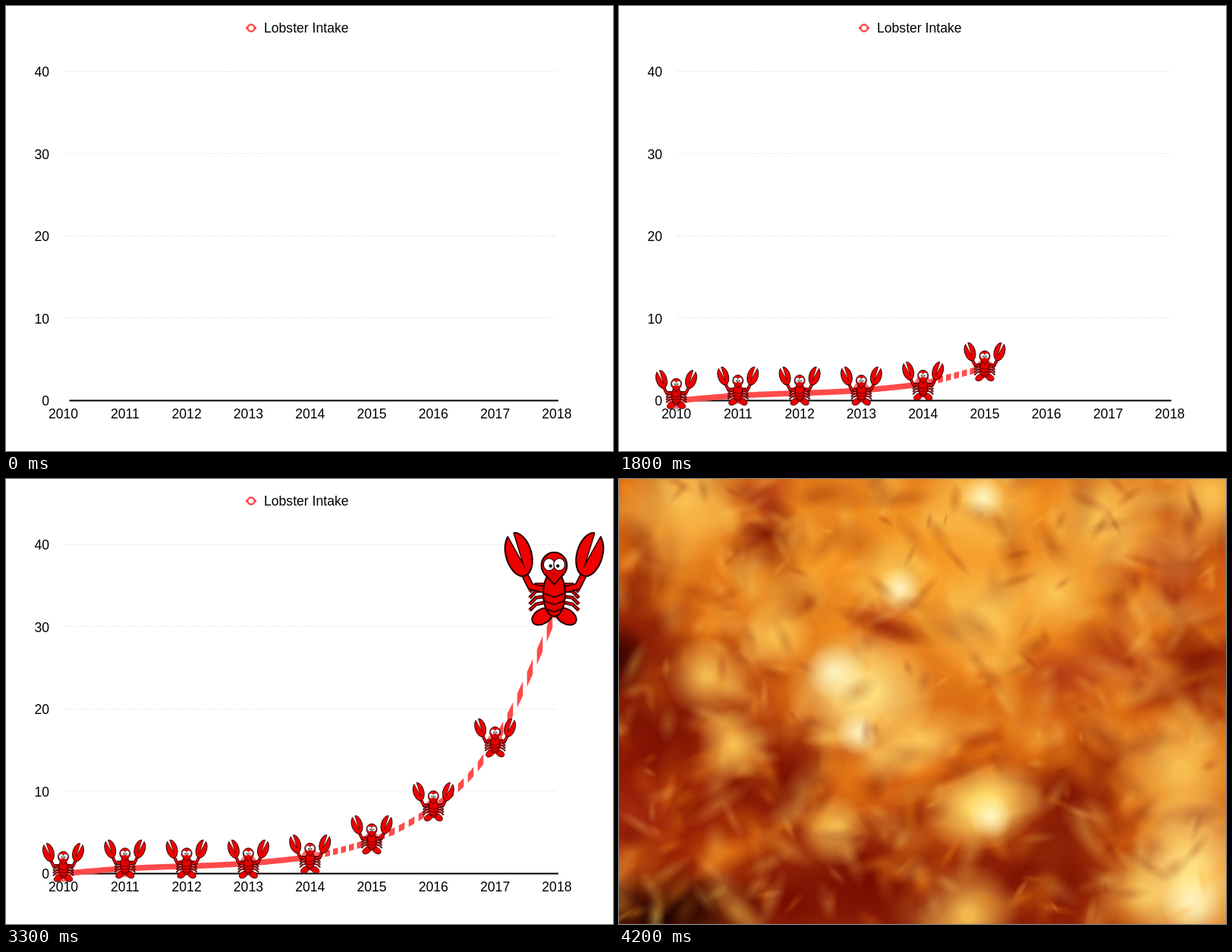
Write an HTML page with a canvas that moves like this. It is 800 px wide and 587 px high and loops after 5700 ms.

```html
<!DOCTYPE html>
<html lang="en">
<head>
<meta charset="utf-8">
<title>Lobster Intake</title>
<style>
  html, body { margin: 0; width: 100%; height: 100%; overflow: hidden; background: #fff; }
  canvas { display: block; }
</style>
</head>
<body>
<canvas id="stage" width="800" height="587"></canvas>
<script>
const W = 800, H = 587, STEP = 300, LOOP = 5700;
const c = document.getElementById('stage').getContext('2d');
const RED = '#ff4a4a';
const values = [0, .6, .9, 1.25, 2, 4, 8, 16, 32];
const lobsterY = [506, 501.5, 501.5, 501.5, 495, 469.5, 426, 341.5, 167];
const px = year => 75.5 + year * 81.3;
const py = value => 520.5 - value * 10.86;

function seeded(seed) {
  return () => (seed = (seed * 16807) % 2147483647) / 2147483647;
}

function line(points, color, width) {
  c.beginPath();
  points.forEach(([x, y]) => c.lineTo(x, y));
  c.strokeStyle = color;
  c.lineWidth = width;
  c.stroke();
}

function ellipse(x, y, rx, ry, fill, rot = 0, stroke) {
  c.beginPath();
  c.ellipse(x, y, rx, ry, rot, 0, 7);
  c.fillStyle = fill;
  c.fill();
  if (stroke) {
    c.strokeStyle = '#200';
    c.lineWidth = stroke;
    c.stroke();
  }
}

function polygon(points, fill) {
  c.beginPath();
  points.forEach(([x, y]) => c.lineTo(x, y));
  c.closePath();
  c.fillStyle = fill;
  c.fill();
}

// Soft-edged ellipse; core is the share of the radius with full colour
function glow(x, y, rx, ry, rgb, alpha = 1, core = 0, rot = 0) {
  c.save();
  c.translate(x, y);
  c.rotate(rot);
  c.scale(rx, ry);
  const g = c.createRadialGradient(0, 0, core, 0, 0, 1);
  g.addColorStop(0, `rgba(${rgb},${alpha})`);
  g.addColorStop(1, `rgba(${rgb},0)`);
  c.fillStyle = g;
  c.fillRect(-1, -1, 2, 2);
  c.restore();
}

function glows(rgb, alpha, core, list) {
  list.forEach(([x, y, r]) => glow(x, y, r, r, rgb, alpha, core));
}

// Random light and dark wisps inside a box
function wisps(seed, count, x, y, w, h, size, alpha) {
  const rnd = seeded(seed);
  const tones = ['255,215,100', '120,15,0', '255,150,25'];
  for (let i = 0; i < count; i++) {
    const r = size * (.4 + rnd());
    glow(x + w * rnd(), y + h * rnd(), r, r * (.25 + rnd() * .35),
      tones[i % 3], alpha, 0, rnd() * 3.14);
  }
}

// Natural cubic spline through evenly spaced values
function spline(from, to) {
  const y = values.slice(from, to + 1), n = y.length - 1, m = y.map(() => 0);
  for (let k = 0; k < 40; k++)
    for (let i = 1; i < n; i++)
      m[i] = (6 * (y[i - 1] - 2 * y[i] + y[i + 1]) - m[i - 1] - m[i + 1]) / 4;
  const points = [];
  for (let s = 0; s <= n * 24; s++) {
    const i = Math.min(n - 1, Math.floor(s / 24)), b = s / 24 - i, a = 1 - b;
    const v = a * y[i] + b * y[i + 1] + ((a ** 3 - a) * m[i] + (b ** 3 - b) * m[i + 1]) / 6;
    points.push([px(from + i + b), py(v)]);
  }
  return points;
}

function lobster(x, y, scale) {
  c.save();
  c.translate(x, y);
  c.scale(scale, scale);
  for (const side of [-1, 1]) {
    c.save();
    c.scale(side, 1);
    for (let i = 0; i < 4; i++) {
      const leg = [[4, 3 + i * 3.2], [10, 3 + i * 3.6], [13.5, 7 + i * 3.4]];
      line(leg, '#200', 2);
      line(leg, '#d00', .9);
    }
    const arm = [[17, -4], [13, 4], [5, 6]];
    line(arm, '#200', 4);
    line(arm, '#e00', 2.6);
    ellipse(6.5, 20.5, 6.2, 4, '#f00000', .55, .8);
    c.translate(19.5, -13.5);
    c.rotate(.27);
    ellipse(0, 0, 7, 12.2, '#f00000', 0, .9);
    polygon([[-.5, -13.2], [3.4, -12.5], [-1, 6]], '#fff');
    line([[-.5, -12.2], [-1, 6], [3.2, -11.4]], '#200', .6);
    c.restore();
  }
  ellipse(0, 8, 6, 12.5, '#e80000', 0, .9);
  for (let i = 0; i < 3; i++)
    line([[-5.4, 8 + i * 4], [0, 10 + i * 4], [5.4, 8 + i * 4]], '#300', .8);
  ellipse(0, -7.5, 7, 7.2, '#f00000', 0, .9);
  for (const side of [-1, 1]) {
    ellipse(side * 2.8, -8, 3.1, 3.4, '#fff', 0, .5);
    ellipse(side * 2, -7.2, .9, .9, '#000');
  }
  polygon([[-6, -3.5], [0, -5], [6, -3.5], [0, 4]], '#e00000');
  line([[-5.5, -3], [0, 3], [5.5, -3]], '#300', .9);
  c.restore();
}

function axes() {
  c.fillStyle = '#fff';
  c.fillRect(0, 0, W, H);
  c.fillStyle = '#000';
  c.font = '17.6px "Liberation Sans", Arial, sans-serif';
  c.textAlign = 'right';
  for (let v = 0; v <= 40; v += 10) c.fillText(v, 57, py(v) + 6.8);
  c.textAlign = 'center';
  for (let i = 0; i < 9; i++) c.fillText(2010 + i, px(i), 544.3);
  c.textAlign = 'left';
  c.fillText('Lobster Intake', 340, 35.3);

  c.setLineDash([5, 2]);
  for (let v = 10; v <= 40; v += 10) {
    const y = Math.floor(py(v)) + .5;
    line([[76, y], [726, y]], '#eee', 1);
  }
  c.setLineDash([]);
  line([[83.5, 520.5], [728, 520.5]], '#000', 2);
  line([[316, 29], [330, 29]], RED, 3);
  ellipse(323, 29, 5.8, 5.8, RED);
  ellipse(323, 29, 3.3, 3.3, '#fff');
}

// Vertical slices cut the forecast part into dashes
function forecast(last) {
  c.save();
  c.beginPath();
  for (let x = 410; x < 480; x += 10.5) c.rect(x, 0, 6.5, H);
  for (let x = 478.7; x < 735; x += 13) c.rect(x, 0, 7.6, H);
  c.clip();
  line(spline(4, last), RED, 8);
  c.restore();
}

function chart(count, big) {
  axes();
  const last = count - 1;
  if (last > 0) line(spline(0, Math.min(last, 4)), RED, 7.5);
  if (last > 4) forecast(last);
  for (let i = 0; i < count; i++) {
    const grown = big && i === 8;
    ellipse(px(i), py(values[i]), 11, 11, '#ff6b69');
    if (grown) lobster(722.5, 132, 2.4);
    else lobster(px(i), lobsterY[i], 1);
  }
}

function ragged(seed, x, y, rx, ry, jitter, fill) {
  const rnd = seeded(seed), points = [];
  for (let i = 0; i < 90; i++) {
    const a = i / 90 * 2 * Math.PI;
    const k = 1 + .05 * Math.sin(a * 4 - 1.5) + jitter * (rnd() - .5);
    points.push([x + rx * k * Math.cos(a), y + ry * k * Math.sin(a)]);
  }
  polygon(points, fill);
}

function fireball() {
  ragged(41, 716, 126, 66, 68, .14, '#1d2a31');
  polygon([[645, 70], [662, 72], [676, 58], [690, 61], [684, 75], [662, 92], [647, 84]], '#1d2a31');
  polygon([[704, 55], [718, 52], [724, 64], [702, 66]], '#1d2a31');
  c.save();
  ragged(97, 713, 126, 65, 65, .08, '#d97712');
  c.clip();
  glows('105,35,8', .75, .1, [[668, 135, 32], [688, 165, 28], [764, 150, 28], [662, 102, 20], [745, 180, 26]]);
  glows('255,185,45', .85, .1, [[740, 95, 34], [705, 112, 28], [718, 145, 28], [690, 80, 22], [758, 125, 22]]);
  wisps(7, 150, 646, 58, 136, 136, 11, .5);
  c.restore();
}

function cloud() {
  const sky = c.createRadialGradient(405, 250, 60, 405, 225, 500);
  [[0, '#ffd070'], [.16, '#e88a24'], [.31, '#bd3a08'], [.46, '#990d02'], [.66, '#590604'], [.85, '#280404'], [1, '#170303']]
    .forEach(([at, color]) => sky.addColorStop(at, color));
  c.fillStyle = sky;
  c.fillRect(0, 0, W, H);
  glow(60, 400, 290, 190, '22,3,3', .95, .3);
  glow(730, 400, 250, 170, '22,2,2', .95, .3);

  // Stem
  polygon([[320, 320], [510, 320], [545, 400], [590, 500], [180, 500], [225, 440], [280, 390]], '#b93c0a');
  glows('150,22,4', .85, .3, [[265, 415, 45], [555, 420, 45], [260, 350, 38], [300, 340, 42], [545, 355, 42], [230, 450, 42]]);
  glows('240,120,20', .8, .2, [[350, 390, 65], [460, 385, 60], [350, 460, 70], [500, 450, 60]]);
  wisps(23, 110, 240, 335, 300, 160, 20, .45);
  glows('255,232,130', .95, .3, [[430, 360, 42], [405, 395, 20], [415, 460, 28], [515, 470, 34], [200, 470, 18], [315, 480, 24], [540, 405, 18], [455, 385, 26]]);

  // Cap
  glows('255,190,80', 1, .75, [[245, 290, 36], [565, 305, 33], [320, 310, 40], [470, 310, 38], [535, 320, 30]]);
  glows('240,255,244', 1, .85, [[405, 200, 53], [320, 216, 46], [462, 202, 42], [260, 255, 46], [345, 245, 62], [510, 243, 50],
    [545, 262, 37], [430, 230, 60], [565, 290, 30], [245, 275, 32], [490, 280, 42]]);
  glows('218,150,62', .9, .55, [[425, 262, 46], [400, 300, 42], [355, 305, 38], [440, 305, 32]]);
  glows('185,75,22', .8, .4, [[308, 312, 38], [515, 322, 26], [275, 335, 30], [375, 325, 28]]);
  glows('255,215,125', .7, .2, [[420, 248, 28], [415, 288, 24], [470, 322, 20], [560, 318, 20]]);

  // Dust along the ground
  glow(400, 550, 440, 65, '150,12,4', 1, .5);
  glows('195,30,12', .95, .5, [[75, 492, 38], [120, 500, 42], [165, 508, 42], [215, 515, 38], [620, 510, 40], [690, 505, 42], [738, 495, 36], [755, 515, 34]]);
  glows('120,8,4', .9, .5, [[290, 520, 45], [370, 515, 48], [440, 510, 42], [520, 520, 45], [580, 515, 40]]);
  const rnd = seeded(11);
  for (let x = 0; x <= W; x += 17) {
    const y = 532 + rnd() * 22, r = 14 + rnd() * 9;
    glow(x, y, r, r * .8, '165,17,8', .9, .6);
    glow(x + 3, y + 7, r, r * .75, '55,3,3', .9, .4);
  }
  c.fillStyle = '#a90b07';
  c.fillRect(0, 567, W, 7);
  c.fillStyle = '#120202';
  c.fillRect(0, 574, W, 13);

  // Trees
  [[135, 548], [187, 545], [229, 534], [259, 543]].forEach(([x, y], i) => {
    line([[x, 576], [x + 2, y]], '#160202', 5);
    ellipse(x - 8, y, 12, 7, '#160202', .3);
    ellipse(x + 8, y + 2, i === 3 ? 4 : 11, 8, '#160202', -.3);
  });

  // Tower
  const dark = 'rgba(65,12,4,.85)';
  line([[468, 255], [468, 572]], dark, 2);
  line([[494, 290], [499, 572]], dark, 2);
  line([[481, 300], [484, 572]], dark, 1);
  for (let y = 310; y < 570; y += 20)
    line([[468, y], [496, y + 20], [468, y + 20]], 'rgba(65,12,4,.5)', 1);
  for (const y of [310, 350, 430]) line([[467, y], [497, y]], dark, 3);
  c.fillStyle = dark;
  c.fillRect(465, 255, 26, 14);
  c.fillRect(465, 269, 8, 25);
}

function inferno() {
  c.fillStyle = '#d4600f';
  c.fillRect(0, 0, W, H);
  glow(410, 110, 460, 240, '246,158,40', .9, .1);
  glow(30, 420, 330, 270, '135,12,0', .9, .1);
  glow(460, 570, 330, 150, '120,8,0', .85, .1);
  glows('110,5,0', .85, .05, [[10, 220, 110], [60, 310, 90], [215, 400, 90], [590, 420, 85], [560, 520, 100], [330, 530, 110], [225, 560, 100], [770, 250, 85], [200, 80, 55]]);
  glows('175,50,20', .8, .1, [[720, 120, 100], [660, 250, 80], [350, 190, 55], [580, 260, 60], [20, 440, 60], [190, 20, 50]]);
  glow(60, 570, 150, 65, '30,0,0', .95, .2);
  glow(0, 240, 40, 50, '25,0,0', .8);
  wisps(31, 420, 0, 0, W, H, 48, .3);
  glows('255,205,90', .85, .1, [[85, 25, 90], [475, 30, 85], [365, 130, 62], [480, 180, 85], [210, 205, 50], [115, 260, 55], [150, 350, 48],
    [285, 465, 48], [640, 55, 85], [575, 150, 60], [740, 385, 95], [460, 575, 70], [690, 545, 60], [780, 20, 75]]);
  glow(320, 280, 100, 85, '255,222,125', 1, .2);
  glow(385, 350, 95, 48, '255,205,95', .9, .1, -.35);
  glow(480, 430, 85, 60, '255,218,105', 1, .2, -.3);
  glow(755, 525, 90, 120, '255,225,130', 1, .15);
  glows('255,248,200', .85, .1, [[285, 255, 40], [315, 335, 30], [370, 145, 30], [755, 560, 40], [480, 25, 30], [490, 445, 30]]);
  glow(430, 395, 90, 11, '165,50,5', .6, 0, -.4);
  glow(350, 195, 75, 17, '140,30,5', .7, 0, .35);
  wisps(59, 330, 0, 0, W, H, 27, .24);
}

function draw(step) {
  if (step >= 14) return inferno();
  if (step === 13) return cloud();
  chart(Math.min(step, 9), step >= 10);
  if (step === 12) fireball();
}

let shown = -1, start;
function tick(now) {
  start ??= now;
  const step = Math.min(14, Math.floor((now - start) % LOOP / STEP));
  if (step !== shown) draw(shown = step);
  requestAnimationFrame(tick);
}
draw(shown = 0);
requestAnimationFrame(tick);
</script>
</body>
</html>
```
